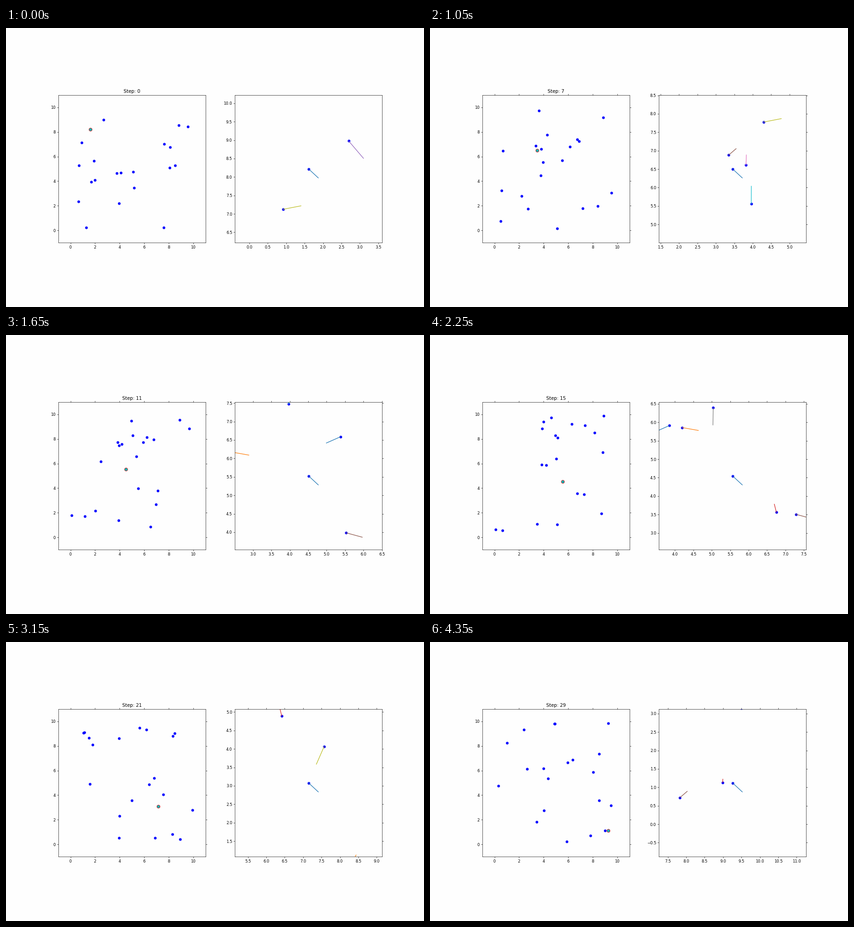
A matplotlib script for the animation above (4.5 s loop, 917 by 611 pixels).

```python
import numpy as np
import matplotlib.pyplot as plt
from matplotlib.animation import FuncAnimation

WIDTH, HEIGHT = 917, 611
DPI = WIDTH / 15
STEPS, INTERVAL = 30, 150
BOX = 10      # particles wrap around a square of this side
VIEW = 2      # half-width of the close-up
PAPER = "#fefefe"

# Each particle is one key point and a steady drift (x, y, vx, vy);
# the first one is followed.
PARTICLES = np.array([
    (1.606, 8.220, 0.2639, -0.2448), (7.642, 7.022, 0.4371, -0.0776),
    (8.104, 6.773, -0.1968, 0.0878), (7.590, 0.235, -0.0557, 0.2216),
    (2.695, 8.977, 0.4019, -0.4702), (1.922, 5.660, 0.2035, 0.1744),
    (3.755, 4.655, 0.0090, 0.2788), (5.190, 3.460, -0.0100, -0.4707),
    (0.917, 7.125, 0.4825, 0.0930), (3.945, 2.180, 0.0022, 0.4822),
    (9.558, 8.437, -0.3805, -0.1682), (5.095, 4.766, 0.1520, 0.2890),
    (8.513, 5.268, 0.1423, -0.3147), (8.830, 8.558, 0.0055, 0.0888),
    (0.632, 2.331, 0.2980, -0.0853), (0.702, 5.295, 0.4388, -0.1192),
    (1.283, 0.210, 0.3352, -0.0672), (8.067, 5.100, 0.3602, -0.2672),
    (1.975, 4.106, -0.2098, -0.4782), (4.089, 4.673, -0.2660, -0.2692),
    (1.691, 3.929, -0.4705, -0.2782),
])
START, DRIFT = PARTICLES[:, :2], PARTICLES[:, 2:]


def positions(step):
    return (START + DRIFT * step) % BOX


# the hundredth of a pixel guards against rounding down
fig, (world, closeup) = plt.subplots(
    1, 2, figsize=((WIDTH + 0.01) / DPI, (HEIGHT + 0.01) / DPI),
    dpi=DPI, facecolor=PAPER)

for ax in (world, closeup):
    ax.set_facecolor(PAPER)
    ax.set_aspect("equal")
world.set_xlim(-1, BOX + 1)
world.set_ylim(-1, BOX + 1)

title = world.set_title("", y=1.0)
world_dots, = world.plot([], [], "bo")
focus, = world.plot([], [], "o", ms=8, mfc=(0, 0.7, 0.7),
                    mec="#d62728", mew=1.2)
near_dots, = closeup.plot([], [], "bo")
arrows = [closeup.plot([], [], color=f"C{i % 10}")[0]
          for i in range(len(PARTICLES))]


def draw(step):
    pos = positions(step)
    cx, cy = pos[0]

    title.set_text(f"Step: {step}")
    focus.set_data([cx], [cy])
    for dots in (world_dots, near_dots):
        dots.set_data(*pos.T)
    for arrow, p, v in zip(arrows, pos, DRIFT):
        arrow.set_data(*np.array([p, p + v]).T)

    closeup.set_xlim(cx - VIEW, cx + VIEW)
    closeup.set_ylim(cy - VIEW, cy + VIEW)
    for ax in (world, closeup):
        ax.tick_params(which="both", top=step > 0, right=step > 0)
    return [title, world_dots, focus, near_dots, *arrows]


def reset():
    return draw(0)


anim = FuncAnimation(fig, draw, frames=STEPS, init_func=reset,
                     interval=INTERVAL, repeat=True, repeat_delay=0,
                     blit=False)
plt.show()
```
